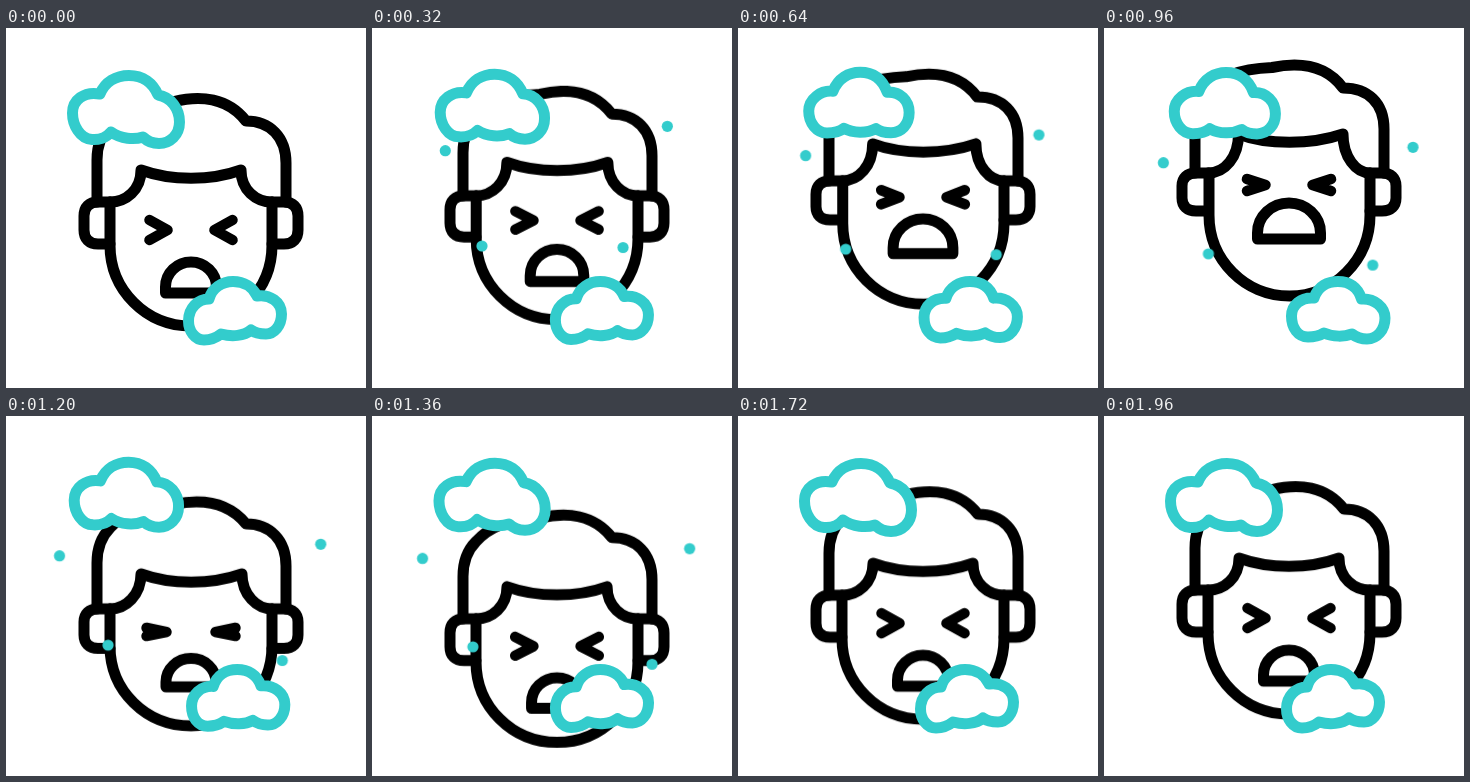
Animation, 360 px wide and 360 px high, one loop 2 s. Source, as an HTML page:

```html
<!DOCTYPE html>
<html lang="en">
<head>
<meta charset="utf-8">
<title>Sneezing face</title>
<style>
  html, body { margin: 0; width: 100%; height: 100%; overflow: hidden; background: #fff; }
  svg { display: block; width: 100%; height: 100%; }
  :root { --soft: cubic-bezier(.36, 0, .64, 1); }

  path { fill: none; stroke: #000; stroke-width: 11; stroke-linecap: round; stroke-linejoin: round; }
  .eye { stroke-width: 10.5; }
  .cloud { fill: #fff; stroke: #3cc; }
  .dot { fill: #3cc; }

  .head, path { animation: 2s var(--soft) infinite; }
  .head { animation-name: nod; }
  .hair { animation-name: hair; }
  .fringe { animation-name: fringe; }
  .face { animation-name: face; }
  .ear { animation-name: ear; }
  .eye { animation-name: squint; }
  .mouth { animation-name: mouth; }
  .upper { animation-name: upper; }
  .lower { animation-name: lower; }
  .dot { animation: drift 2s linear infinite, fade 2s linear infinite; }

  @keyframes nod {
    0%, 2%, 100% { transform: translateY(0); }
    48% { transform: translateY(-29px); }
    65% { transform: translateY(30.5px); animation-timing-function: cubic-bezier(.2, 0, .4, 1); }
  }

  @keyframes hair {
    0%, 2%, 70%, 100% { d: path("M91 174V132C91 117 95 106 104 97C116 84 132 75 168 73.5C195 67 222 70 240 93C264 93 280 109 280 135V174"); }
    48% { d: path("M91 174V127C91 112 95 101 104 92C116 79 132 70 168 68.5C195 63 222 66 239 89C264 89 280 104 280 130V174"); animation-timing-function: ease-in; }
    60% { d: path("M91 174V128C91 113 95 102 104 93C116 80 132 71 168 69.5C195 64 222 67 240 89C264 89 280 105 280 131V174"); animation-timing-function: ease-out; }
  }

  @keyframes fringe {
    0%, 2%, 70%, 100% { d: path("M104 174C120 174 135 162 135 142C165 153 205 153 235 142C235 162 250 174 266 174"); }
    48% { d: path("M104 174C121 174 134.5 158 134.5 135C163 146 207 146 239 135C239 158 252 174 266 174"); animation-timing-function: ease-in; }
    60% { d: path("M104 174C120 174 135 160 135 139C165 150 205 150 236 139C236 160 251 174 266 174"); animation-timing-function: ease-out; }
  }

  @keyframes face {
    0%, 2%, 70%, 100% { d: path("M104 174V217C104 262 140 298 185 298S266 262 266 217V174"); }
    48% { d: path("M105 174V216C105 261 141 297 185.5 297S266 261 266 216V174"); animation-timing-function: ease-in; }
    60% { d: path("M104 174V211C104 256 140 291 185 291S266 256 266 211V174"); animation-timing-function: ease-out; }
  }

  @keyframes ear {
    0%, 2%, 70%, 100% { d: path("M104 174H92C83 174 78 179 78 188V202C78 211 83 216 92 216H104"); }
    48% { d: path("M104 174H92C83 174 78 179 78 187V199C78 207 83 212 92 212H104"); animation-timing-function: ease-in; }
    60% { d: path("M104 174H92C83 174 78 179 78 187V200C78 208 83 213.5 92 213.5H104"); animation-timing-function: ease-out; }
  }

  @keyframes squint {
    0%, 2%, 71%, 100% { d: path("M143.5 192L161.5 202L143.5 212"); }
    48% { d: path("M143 180L161.5 186L143 192"); animation-timing-function: ease-in; }
    60% { d: path("M140.5 193L160.5 197L140.5 201"); animation-timing-function: ease-out; }
  }

  @keyframes mouth {
    0%, 2%, 71%, 100% { d: path("M159.5 265V259C159.5 245 171 234 185 234S210.5 245 210.5 259V265Z"); }
    48% { d: path("M153.5 240V234C153.5 217 168 204 185 204S216.5 217 216.5 234V240Z"); animation-timing-function: ease-in; }
    60% { d: path("M160 252V247C160 234 171 223.5 185 223.5S210 234 210 247V252Z"); animation-timing-function: ease-out; }
  }

  @keyframes upper {
    0%, 76%, 100% { d: path("M94 66C99 54 110 47.5 123 47.5C137 47.5 147 55 152 67C165 69 173.5 81 173.5 94C173.5 107 164 115.5 153 115.5C147 115.5 141 113 137 109C128 112 115 111 105 104C100 110 92 112 86 111.5C74 111 66.5 97 66.5 85C66.5 72 78 63 94 66Z"); }
    38% { d: path("M95 63C100 50 111 44 122 44C134 44 144 50 149 64C162 63 171 72 171 84C171 96 163 104 153 104C147 104 142 103 138 100C129 105 115 105 106 100C101 104 95 104.5 89 104.5C79 104.5 71 95 71 83C71 71 83 62 95 63Z"); }
  }

  @keyframes lower {
    0%, 4%, 76%, 100% { d: path("M203 271C206 260 216 253.5 227 253.5C238 253.5 247 259 251 268C264 266 275.5 274 275.5 286C275.5 298 268 306 260 306C254 306 249 305 245 302C238 308 226 309 215 306C210 310 203 312 198 312C189 312 182.5 303 182.5 293C182.5 280 192 271 203 271Z"); }
    48% { d: path("M210 270C214 258 224 253.5 234 253.5C245 253.5 254 259 257.5 271C270 270 281 279 281 290C281 302 273 311 263 311C257 311 252 309 248 306C240 309 229 309 220 305C215 308 209 309 204 309C194 309 187.5 300 187.5 288C187.5 277 197 269 210 270Z"); }
  }

  @keyframes drift {
    0%, 6% { translate: calc(var(--dx) * -.06) calc(var(--dy) * -.06); }
    16% { translate: 0 0; }
    32% { translate: calc(var(--dx) * .22) calc(var(--dy) * .22); }
    48% { translate: calc(var(--dx) * .54) calc(var(--dy) * .54); }
    60% { translate: calc(var(--dx) * .77) calc(var(--dy) * .77); }
    76% { translate: var(--dx) var(--dy); }
    80%, 100% { translate: calc(var(--dx) * 1.03) calc(var(--dy) * 1.03); }
  }

  @keyframes fade {
    0%, 6% { opacity: 0; }
    14%, 75% { opacity: 1; }
    84%, 100% { opacity: 0; }
  }
</style>
</head>
<body>
<svg viewBox="0 0 360 360">
  <g class="head">
    <path class="hair"/>
    <path class="fringe"/>
    <path class="face"/>
    <path class="ear"/>
    <path class="eye"/>
    <g transform="matrix(-1 0 0 1 370 0)">
      <path class="ear"/>
      <path class="eye"/>
    </g>
    <path class="mouth"/>
  </g>
  <path class="cloud upper"/>
  <path class="cloud lower"/>
  <circle class="dot" cx="73.3" cy="122.7" r="5.6" style="--dx:-25.7px; --dy:22.3px"/>
  <circle class="dot" cx="295.3" cy="98.3" r="5.6" style="--dx:25.2px; --dy:38.8px"/>
  <circle class="dot" cx="110" cy="218" r="5.6" style="--dx:-10.3px; --dy:14.5px"/>
  <circle class="dot" cx="251" cy="219.5" r="5.6" style="--dx:32.8px; --dy:32.5px"/>
</svg>
</body>
</html>
```
